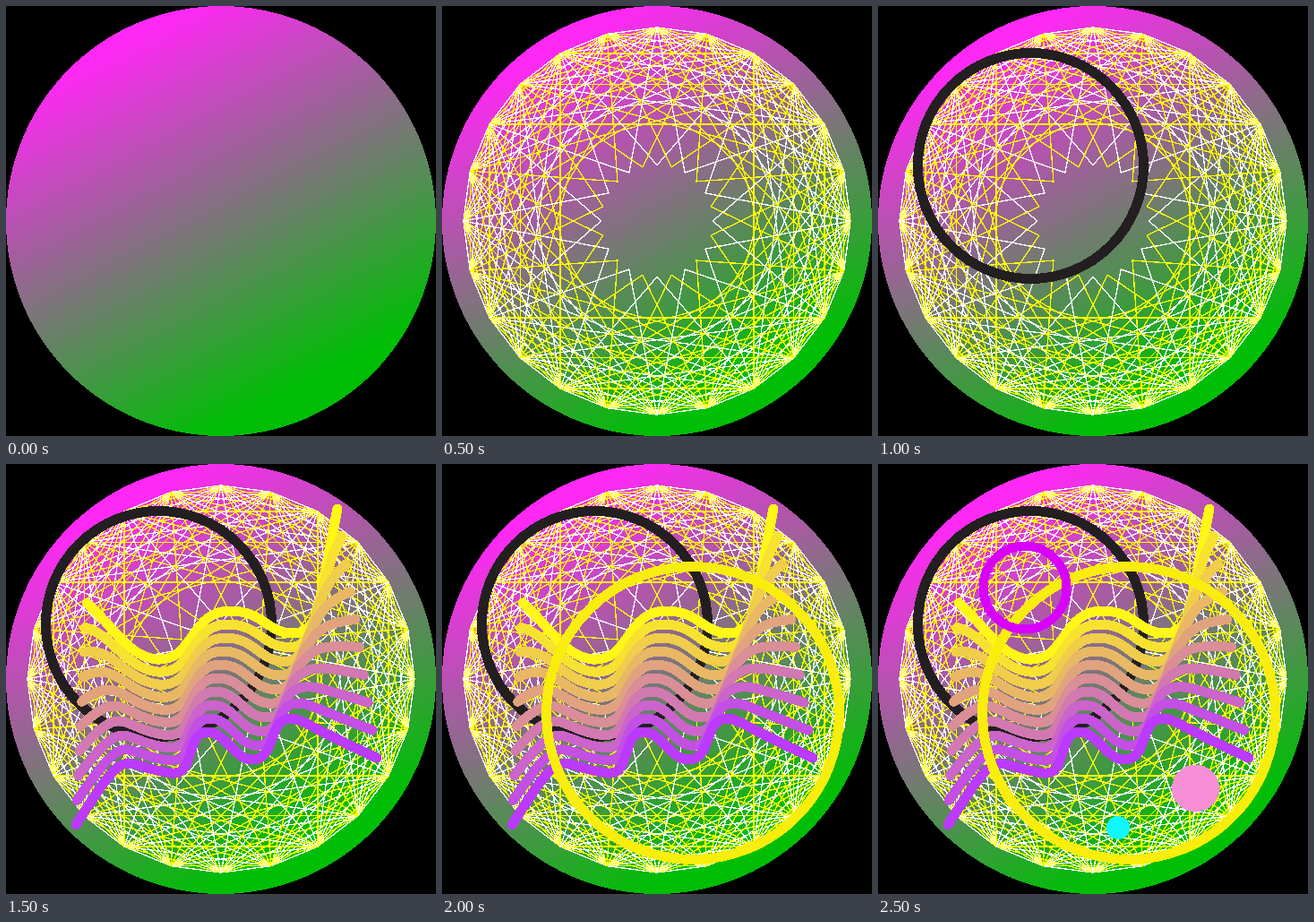
These frames come from a looping animation (480 by 480 pixels, 3 s). An HTML page:

```html
<!DOCTYPE html>
<html lang="en">
<head>
<meta charset="utf-8">
<title>Layered circles</title>
<style>
html, body { margin: 0; width: 100%; height: 100%; overflow: hidden; background: #000; }
svg { display: block; width: 480px; height: 480px; shape-rendering: crispEdges; }
</style>
</head>
<body>
<svg id="stage" viewBox="0 0 480 480" fill="none">
  <defs>
    <linearGradient id="disc" gradientUnits="userSpaceOnUse" x1="135" y1="41" x2="334" y2="419">
      <stop offset="0" stop-color="#ff28f5"/>
      <stop offset="1" stop-color="#00be05"/>
    </linearGradient>
  </defs>
  <circle cx="240" cy="240" r="240" fill="url(#disc)"/>
</svg>
<script>
const LOOP = 3000, STEP = 500;
const N = 24, OUTER = 216, INNER = OUTER * Math.tan(Math.PI / 6) / 2;
const YELLOW = '#ffff00', WHITE = '#ffffff';
const stage = document.getElementById('stage');
const layers = [];

function add(parent, tag, attrs = {}) {
  const el = document.createElementNS('http://www.w3.org/2000/svg', tag);
  for (const key in attrs) el.setAttribute(key, attrs[key]);
  return parent.appendChild(el);
}

function layer() {
  const g = add(stage, 'g', { visibility: 'hidden' });
  layers.push(g);
  return g;
}

function ring(g, cx, cy, r, stroke, width) {
  add(g, 'circle', { cx, cy, r, stroke, 'stroke-width': width });
}

function polar(i, r) {
  const a = i * 2 * Math.PI / N;
  return (240 + r * Math.sin(a)).toFixed(2) + ' ' + (240 - r * Math.cos(a)).toFixed(2);
}

// Chords between the rim points, plus four six-pointed stars
function web(g) {
  const draw = (d, stroke) => add(g, 'path', { d, stroke, 'stroke-width': 1.4 });
  for (let k = 1; k <= 8; k++) {
    let d = '';
    for (let i = 0; i < N; i++) d += `M${polar(i, OUTER)}L${polar(i + k, OUTER)}`;
    draw(d, k % 2 ? WHITE : YELLOW);
  }
  for (let s = 0; s < 4; s++) {
    const pts = [];
    for (let i = s; i < s + N; i += 4) pts.push(polar(i, INNER), polar(i + 2, OUTER));
    draw('M' + pts.join('L') + 'Z', s % 2 ? YELLOW : WHITE);
  }
}

// Ribbons blended between two curves and two colours
function ribbons(g, count) {
  const top = [90,155, 115,175, 135,215, 168,218, 210,221, 205,164, 250,164,
    288,164, 290,189, 322,189, 345,189, 350,160, 354,135, 358,110, 364,80, 370,50];
  const bottom = [78,403, 140,305, 125,338, 185,345, 212,348, 200,299, 225,299,
    245,299, 255,330, 275,330, 302,330, 292,284, 318,284, 332,284, 345,298, 414,328];
  const from = [255, 247, 22], to = [188, 58, 255];
  for (let i = 0; i < count; i++) {
    const mix = (a, b) => a.map((v, j) => v + (b[j] - v) * i / (count - 1));
    const [x, y, ...rest] = mix(top, bottom);
    add(g, 'path', {
      d: `M${x} ${y}C${rest.join(' ')}`,
      stroke: `rgb(${mix(from, to).map(Math.round)})`,
      'stroke-width': 11, 'stroke-linecap': 'round'
    });
  }
}

web(layer());
ring(layer(), 170.5, 178.5, 126, '#231f20', 11);
ribbons(layer(), 10);
ring(layer(), 280, 278, 163.5, '#f9ed0c', 11);

const dots = layer();
ring(dots, 164, 138, 46.5, '#d800ff', 10);
add(dots, 'circle', { cx: 354.5, cy: 362, r: 26.5, fill: '#f78fd6' });
add(dots, 'circle', { cx: 268, cy: 406, r: 13, fill: '#0ff8ff' });

function frame(now) {
  const step = Math.floor(now % LOOP / STEP);
  layers.forEach((g, i) => g.setAttribute('visibility', i < step ? 'visible' : 'hidden'));
  requestAnimationFrame(frame);
}
const start = performance.now();
requestAnimationFrame(t => frame(Math.max(0, t - start)));
</script>
</body>
</html>
```
